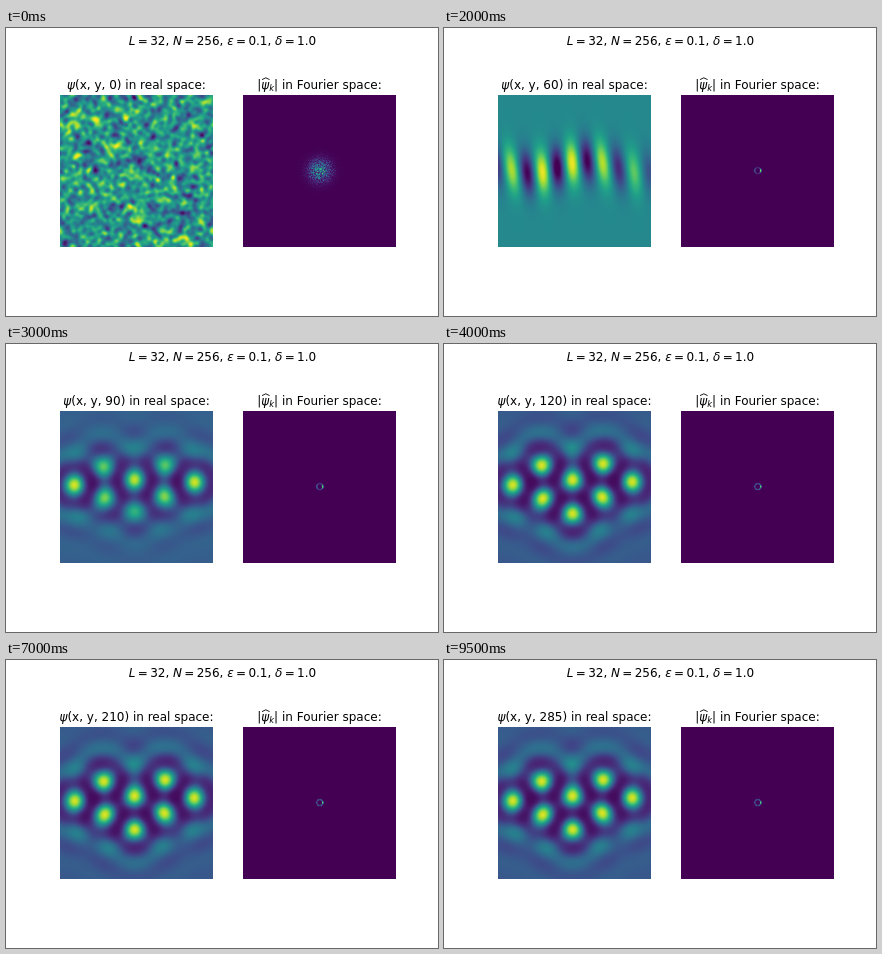
These frames come from a looping animation (432x288 px, 10 s). An HTML page with a canvas:

```html
<!DOCTYPE html>
<html lang="en">
<head>
<meta charset="utf-8">
<title>Pattern formation</title>
<style>
html, body { margin: 0; width: 100%; height: 100%; overflow: hidden; background: #fff; }
canvas, svg { position: absolute; left: 0; top: 0; width: 432px; height: 288px; }
text { font: 12px "DejaVu Sans", sans-serif; fill: #000; white-space: pre; }
.i { font-style: italic; }
.sub { font-size: 8.4px; }
</style>
</head>
<body>
<canvas id="stage" width="432" height="288"></canvas>
<svg viewBox="0 0 432 288">
  <text x="216.5" y="17" text-anchor="middle"><tspan class="i">L</tspan><tspan dx="2.3">=</tspan><tspan dx="2.3">32, </tspan><tspan class="i">N</tspan><tspan dx="2.3">=</tspan><tspan dx="2.3">256, </tspan><tspan class="i">ε</tspan><tspan dx="2.3">=</tspan><tspan dx="2.3">0.1, </tspan><tspan class="i">δ</tspan><tspan dx="2.3">=</tspan><tspan dx="2.3">1.0</tspan></text>
  <text x="130.5" y="61" text-anchor="middle"><tspan class="i">ψ</tspan>(x, y, <tspan id="clock">0</tspan>) in real space:</text>
  <text x="313.5" y="61" text-anchor="middle">|<tspan class="i">ψ</tspan><tspan class="i sub" dy="2">k</tspan><tspan dy="-2">| in Fourier space:</tspan></text>
  <path d="M256 51.6L259.8 49.8L263.6 51.6" fill="none" stroke="#000" stroke-width=".9"/>
</svg>
<script>
const W = 153, H = 152, LEFT = 54, RIGHT = 237, TOP = 67;
const STEP = 500, COUNT = 20;
const ctx = document.getElementById('stage').getContext('2d');
const clock = document.getElementById('clock');

const viridis = ['440154', '482878', '3e4989', '31688e', '26828e', '1f9e89', '35b779', '6ece58', 'b5de2b', 'fde725']
  .map(h => [0, 2, 4].map(i => parseInt(h.slice(i, i + 2), 16)));
const clamp = v => Math.max(0, Math.min(1, v));

function seeded(s) {
  return () => {
    s = (s + 0x6d2b79f5) | 0;
    let t = Math.imul(s ^ (s >>> 15), 1 | s);
    t = (t + Math.imul(t ^ (t >>> 7), 61 | t)) ^ t;
    return ((t ^ (t >>> 14)) >>> 0) / 4294967296;
  };
}
const rnd = seeded(11);

function makeField(fn) {
  const out = new Float32Array(W * H);
  for (let y = 0, i = 0; y < H; y++)
    for (let x = 0; x < W; x++) out[i++] = fn(x, y);
  return out;
}

// Windowed Bessel J0: the response of one spot at the critical wavelength
const WAVE = 2 * Math.PI / 30, REACH = 28, FINE = 8;
const kernel = Array.from({ length: 230 * FINE }, (_, i) => {
  const r = i / FINE;
  let sum = 0;
  for (let j = 0; j < 40; j++) sum += Math.cos(WAVE * r * Math.cos(Math.PI * (j + .5) / 40));
  return sum / 40 * Math.exp(-r * r / (2 * REACH * REACH));
});
const response = (p, x, y) => kernel[Math.round(Math.hypot(x - p.x, y - p.y) * FINE)];

// Fits spot strengths so the field takes each spot's level at its centre
function pattern(base, soft, spots) {
  for (const p of spots) p.a = 0;
  for (let n = 0; n < 80; n++)
    for (const p of spots) {
      let rest = p.level - base;
      for (const q of spots) if (q !== p) rest -= q.a * response(p, q.x, q.y);
      p.a = rest / 1.05;
    }
  return makeField((x, y) => {
    let u = 0;
    for (const p of spots) u += p.a * response(p, x + .5 + LEFT, y + .5 + TOP);
    return clamp(base + (soft && u < 0 ? base * Math.tanh(u / base) : u));
  });
}

function blur(src, dx, dy) {
  return makeField((x, y) => {
    let sum = 0;
    for (let k = -1; k <= 1; k++)
      sum += src[(y + k * dy + H) % H * W + (x + k * dx + W) % W];
    return sum / 3;
  });
}

function noise() {
  let f = makeField(() => rnd() - .5);
  for (let n = 0; n < 5; n++) f = blur(blur(f, 1, 0), 0, 1);
  const dev = Math.sqrt(f.reduce((s, v) => s + v * v, 0) / f.length);
  return f.map(v => clamp(.53 + .15 * v / dev));
}

// Crests and troughs of the first waves
const waves = () => [
  ...[[100, 149], [126, 129], [158, 118], [191, 131], [164, 149]].map(([x, y]) => ({ x, y, level: .95 })),
  ...[[113, 138], [140, 119], [173, 131], [82, 147]].map(([x, y]) => ({ x, y, level: .04 }))
];

// Leaning vertical stripes along a wavy midline
const stripes = () => makeField((px, py) => {
  const x = px + .5 + LEFT, y = py + .5 + TOP;
  const mid = 139 + 6 * Math.cos((x - 88) * Math.PI / 55);
  const fade = Math.exp(-(((y - mid) / 22) ** 2) - ((x - 115) / 95) ** 2);
  return clamp(.47 + .52 * fade * Math.cos((x - 98 - .1 * (y - 140)) * 2 * Math.PI / 30.7));
});

// Eight hexagonally packed spots in five columns
function lattice(squeeze, level) {
  const spots = [];
  for (let i = -2; i <= 2; i++) {
    const odd = i & 1, rows = i % 2 || !i ? 2 : 1;
    for (let j = 0; j < rows; j++) {
      const dy = 35 * (j - odd / 2) + 2.3 * Math.abs(i) - .8 * i - 5;
      spots.push({ x: 128.5 + 30.2 * i, y: 140 + dy * squeeze, level: level(Math.abs(dy)) });
    }
  }
  return spots;
}

const real = [
  noise(),
  pattern(.48, false, waves()),
  stripes(),
  pattern(.3, true, lattice(.9, d => .98 - .011 * d)),
  pattern(.28, true, lattice(1, () => .96))
];

const MID_X = 76.8, MID_Y = 75.6;
const ring = (base, lobes, count, turn, glow) => makeField((x, y) => {
  const dx = x + .5 - MID_X, dy = MID_Y - y - .5;
  const a = Math.atan2(dy, dx);
  const around = base + lobes * Math.cos(count * (a - turn)) ** 2 + glow * Math.max(0, Math.cos(a)) ** 8;
  return clamp(around * Math.exp(-(((Math.hypot(dx, dy) - 3) / .7) ** 2)));
});
const fourier = [
  makeField((x, y) => {
    const r2 = (x + .5 - MID_X) ** 2 + (y + .5 - MID_Y) ** 2;
    return clamp(Math.sqrt(-2 * Math.log(1 - rnd())) * .33 * Math.exp(-r2 / 95));
  }),
  ring(.25, .4, 1, .6, 0),
  ring(.1, .2, 1, 0, .7),
  ring(.15, .2, 1, 0, .6),
  ring(.15, .22, 3, 0, .6)
];

// Fast first stage, slow shift to stripes, then quicker settling into spots
const progress = n => Math.min(n, Math.max((n + 2) / 3, n / 2), 4);

function paint(fields, pos, left) {
  const k = Math.min(Math.floor(pos), fields.length - 2), mix = pos - k;
  const a = fields[k], b = fields[k + 1];
  const img = ctx.createImageData(W, H);
  for (let i = 0; i < a.length; i++) {
    const v = (a[i] + (b[i] - a[i]) * mix) * 9;
    const n = Math.min(8, Math.floor(v));
    for (let c = 0; c < 3; c++)
      img.data[i * 4 + c] = viridis[n][c] + (viridis[n + 1][c] - viridis[n][c]) * (v - n);
    img.data[i * 4 + 3] = 255;
  }
  ctx.putImageData(img, left, TOP);
}

let shown = -1;
function tick() {
  const n = Math.floor(performance.now() / STEP) % COUNT;
  if (n !== shown) {
    shown = n;
    paint(real, progress(n), LEFT);
    paint(fourier, progress(n), RIGHT);
    clock.textContent = n * 15;
  }
  requestAnimationFrame(tick);
}
tick();
</script>
</body>
</html>
```
